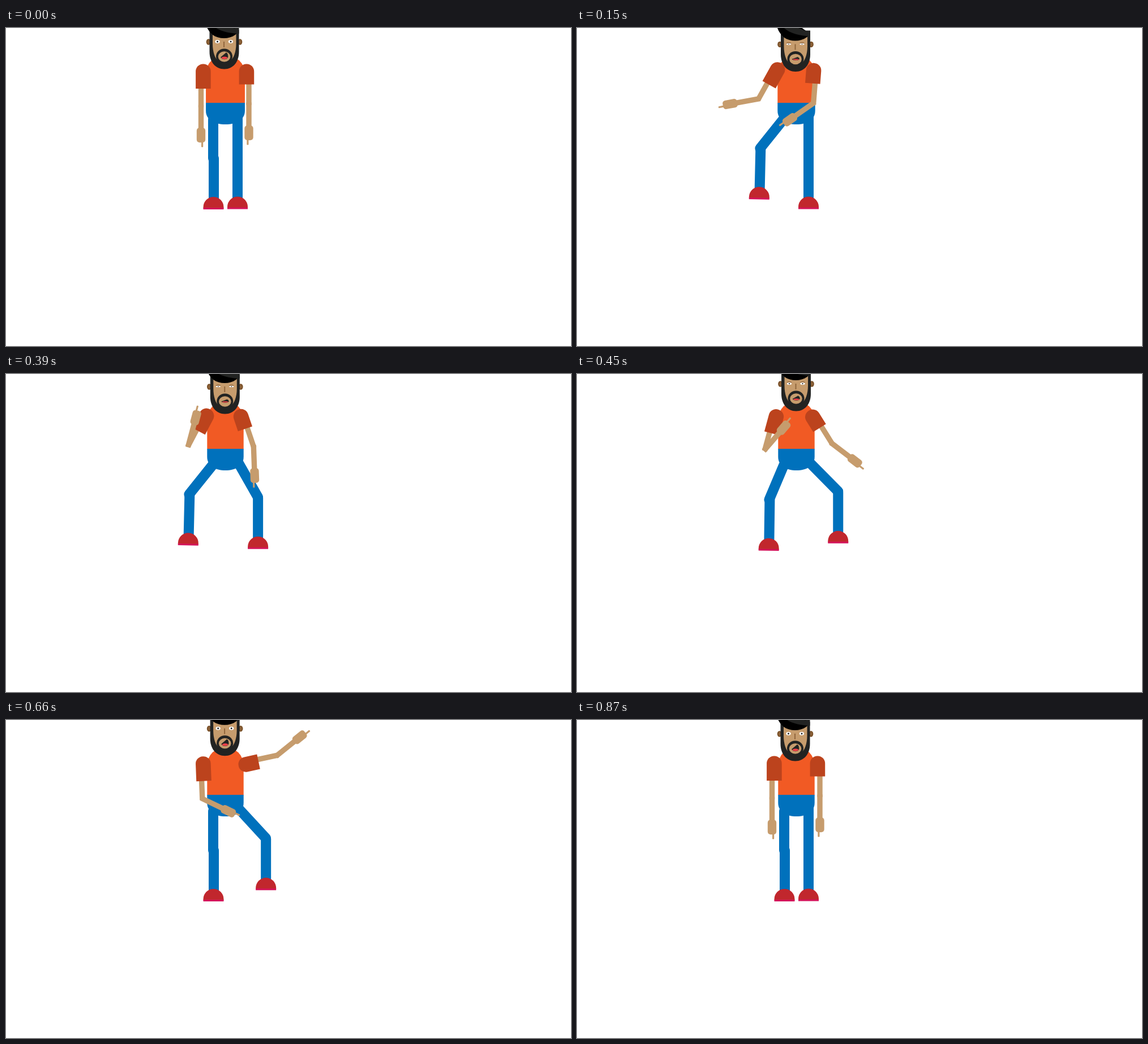
Animation, 998 px wide and 561 px high, one loop 900 ms. Source, as an HTML page with a canvas:

```html
<!DOCTYPE html>
<html lang="en">
<head>
<meta charset="utf-8">
<title>Dancing man</title>
<style>
  html, body { margin: 0; width: 100%; height: 100%; overflow: hidden; background: #fff; }
  canvas { display: block; }
</style>
</head>
<body>
<canvas width="998" height="561"></canvas>
<script>
const ctx = document.querySelector('canvas').getContext('2d');
const SKIN = '#c69c6d', BROWN = '#8c6239', DARK = '#222322', BLUE = '#0071bc',
      SHIRT = '#f15a24', SLEEVE = '#bc431d';
const STEP = 30, STEPS = 30;

const ramp = (f, from, to) => Math.min(1, Math.max(0, (f - from) / (to - from)));
// Rises from 0 to 1 at the peak and falls back to 0.
const hump = (f, from, peak, to) => ramp(f, from, peak) - ramp(f, peak, to);

function rotate(x, y, deg) {
  const a = deg * Math.PI / 180, c = Math.cos(a), s = Math.sin(a);
  return [x * c - y * s, x * s + y * c];
}

function placed(x, y, deg, draw) {
  ctx.save();
  ctx.translate(x, y);
  ctx.rotate(deg * Math.PI / 180);
  draw();
  ctx.restore();
}

function box(color, x, y, w, h, radius = 0) {
  ctx.fillStyle = color;
  ctx.beginPath();
  ctx.roundRect(x, y, w, h, radius);
  ctx.fill();
}

function oval(color, x, y, rx, ry) {
  ctx.fillStyle = color;
  ctx.beginPath();
  ctx.ellipse(x, y, rx, ry, 0, 0, 7);
  ctx.fill();
}

function shape(color, d) {
  ctx.fillStyle = color;
  ctx.fill(new Path2D(d));
}

function line(color, width, d, cap = 'butt') {
  ctx.strokeStyle = color;
  ctx.lineWidth = width;
  ctx.lineCap = cap;
  ctx.stroke(new Path2D(d));
}

// The knee swings around a pivot; the thigh follows it and the shin hangs down.
function leg({ hip, knee, pivot, swing, thighRise = 0, shinTurn = 0, shinShift = 0 }) {
  const [dx, dy] = rotate(knee[0] - pivot[0], knee[1] - pivot[1], swing);
  const x = pivot[0] + dx, y = pivot[1] + dy;
  line(BLUE, 18, `M${hip}L${x} ${y - thighRise}`, 'round');
  placed(x, y, shinTurn, () => {
    line(BLUE, 18, `M${shinShift} 0V76`, 'round');
    ctx.translate(shinShift / 2, 0);
    shape('#c1272d', 'M-18 88V86A18 18 0 0 1 18 86V88Z');
    box('#d4145a', -18, 87, 36, 3);
  });
}

// side is -1 for the arm on the left of the stage, 1 for the other one.
function arm({ side, x, y, sleeve, elbow, upper, fore }) {
  const offset = side * 4;
  placed(x, y, upper, () => {
    box(SKIN, offset - 4.7, 15, 9.4, elbow - 13);
    box(SLEEVE, -13.4, -14.5, 26.6, sleeve + 14.5, [13, 13, 0, 0]);
  });
  const [dx, dy] = rotate(offset, elbow, upper);
  placed(x + dx, y + dy, fore, () => {
    box(SKIN, -4.7, -3, 9.4, 45, 1);
    box(SKIN, -7.7, 38, 15.4, 26, 5);
    box(SKIN, -side * 2.1 - 1.6, 60, 3.2, 12.3, 1);
  });
}

function eye(x, open) {
  oval('#fff', x, 24, 4.2, 3 * open);
  oval(DARK, x, 24, 1.5 * Math.sqrt(open), 1.5 * open);
  if (open < 1) {
    const lid = 24 - 3 * open;
    line(BROWN, 1.2, `M${x - 4} ${lid}Q${x} ${lid - 2.5} ${x + 4} ${lid}`);
    if (!open) line(BROWN, 1.2, `M${x - 4} 22.5Q${x} 26 ${x + 4} 22.5M${x - 3} 25.5h6`);
  }
}

function mouth(open) {
  placed(386, 50, 0, () => {
    const lips = new Path2D(`M-6.5 ${1.5 * open}L3 ${-6.5 * open}Q6 ${-5 * open} 6 ${open}
      Q5 ${5 * open} 0 ${5 * open}T-6.5 ${1.5 * open}Z`);
    ctx.fillStyle = ctx.strokeStyle = DARK;
    ctx.lineWidth = 0.7;
    ctx.fill(lips);
    ctx.stroke(lips);
    ctx.clip(lips);
    oval('#ef4148', 0, 3.2 * open, 5.5, 2.8 * open);
  });
}

function head(open) {
  for (const x of [357.7, 413.3]) {
    oval('#754c24', x, 24.5, 4, 5.2);
    oval(BROWN, x, 24.5, 2.3, 3.5);
  }
  shape(DARK, 'M359.5 0H411.5V42C411.5 60 401 72.5 385.5 72.5S359.5 60 359.5 42Z');
  shape(SKIN, 'M365 5H406.5V28C406.5 42 402 54 396 58H375C369 54 365 42 365 28Z');
  oval(DARK, 385.5, 50.5, 14.5, 14);
  oval(SKIN, 385.5, 50.5, 10.8, 9.3);
  line(BROWN, 1.8, 'M385 24V34');
  eye(373.5, open);
  eye(397, open);
  mouth(open);
  shape('#000', 'M351 -16C352 -4 357 5 365 12C376 20 394 20 405 12L411.5 6L381 -16Z');
  shape(DARK, 'M356 -16C366 2 385 9 411.5 10V3Q396 -1 379 -10L372 -16Z');
}

function draw(f) {
  ctx.clearRect(0, 0, 998, 561);

  // Step to the left, step to the right, and the throw of the arm that follows.
  const left = hump(f, 0, 9, 18), right = hump(f, 9, 18, 29), fling = hump(f, 18, 22, 29);

  leg({
    hip: [366 - 2.5 * left, 161], knee: [366, 230], pivot: [383.8, 126.7],
    swing: 45.8 * left, shinTurn: 2.4 * left, shinShift: 1
  });
  leg({
    hip: [409 + 2.5 * right, 156], knee: [409, 229.5], pivot: [396, 120.5],
    swing: -44.5 * right, thighRise: 2.5 * right
  });

  placed(387.5, 0, 0, () => {
    ctx.scale(1.07 - 0.07 * ramp(f, 0, 9), 1);
    box(SHIRT, -32.2, 48, 64.4, 84.5, [32, 32, 0, 0]);
    shape(BLUE, 'M-32.2 132H32.2V146C32.2 162 18 170 0 170S-32.2 162 -32.2 146Z');
  });

  // The forearm on the left makes one whole turn per loop.
  arm({
    side: -1, x: 348.5 + 9 * left, y: 78 - 6 * left + right, sleeve: 29, elbow: 60,
    upper: 52.7 * left - 3.5 * right,
    fore: 143.6 * left + 259 * right + 360 * ramp(f, 18, 29)
  });
  arm({
    side: 1, x: 425 - 12.5 * left - 5.5 * right + 3.5 * fling, y: 78 - 3 * left,
    sleeve: 21.5, elbow: 56,
    upper: 8 * left - 52 * right - 69 * fling,
    fore: 99 * left - 128.5 * right - 47 * fling
  });

  placed(0.9 * left + 1.8 * right, 8 * left - 14.5 * right, 0, () => head(1 - left));
}

function tick() {
  draw(Math.floor(performance.now() / STEP) % STEPS);
  requestAnimationFrame(tick);
}
tick();
</script>
</body>
</html>
```
